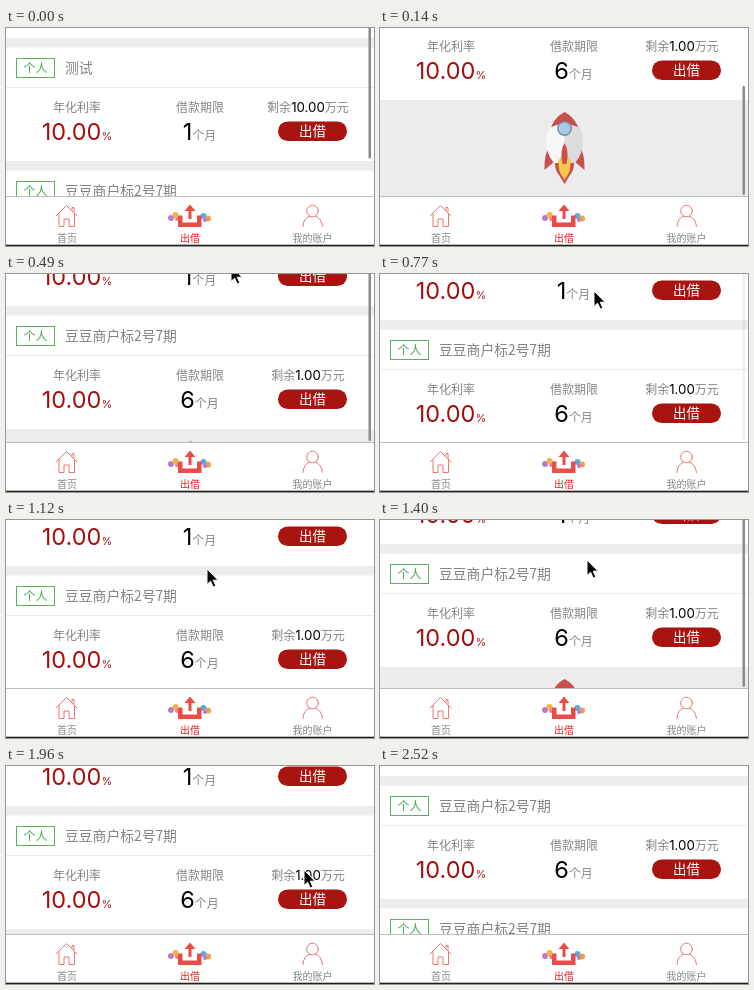
An HTML page that plays this animation: 368 by 218 pixels, repeating every 3.08 s.

```html
<!DOCTYPE html>
<html lang="zh">
<head>
<meta charset="utf-8">
<style>
  html, body { margin: 0; width: 100%; height: 100%; overflow: hidden; background: #fff; }
  svg { display: block; width: 368px; height: 218px; }
  text { font-family: Inter, "Noto Sans CJK SC", "Noto Sans CJK", sans-serif; }
  .cn { font-family: "Noto Sans CJK SC", "Noto Sans CJK", sans-serif; font-weight: 300; }
  .mid { text-anchor: middle; }
  .label { font-size: 12px; fill: #858585; }
  .tab { font-size: 10px; fill: #858585; }
</style>
</head>
<body>
<svg viewBox="0 0 368 218">
  <rect width="368" height="218" fill="#fff"/>
  <g id="list">
    <rect y="132" width="368" height="400" fill="#ececec"/>
    <g id="rocket">
      <path id="flame"/>
      <path id="core" fill="#f9c84a"/>
      <path d="M171 177Q164 185 164.500 203L175 194ZM198 177Q205 185 204.500 203L194 194Z" fill="#c8504c"/>
      <path d="M184.500 145Q166 157 166 174Q166 187 174 196H184.500Z" fill="#f7f7f7"/>
      <path d="M184.500 145Q203 157 203 174Q203 187 195 196H184.500Z" fill="#dcdcdc"/>
      <path d="M184.500 145Q175 150 171 160Q184.500 154 198 160Q194 150 184.500 145Z" fill="#c8504c"/>
      <circle cx="184.500" cy="161.500" r="7.500" fill="#7d8e9d"/>
      <circle cx="184.500" cy="161.500" r="6" fill="#a5cbe9"/>
      <path id="fire" fill="#f9c84a"/>
      <path d="M184.500 176Q189.500 184 186.500 197H182.500Q179.500 184 184.500 176Z" fill="#c8504c"/>
    </g>
    <g id="cards"></g>
  </g>
  <rect id="bar" x="362.500" width="2.500" rx="1.200" fill="#8b8b8b"/>
  <g id="tabs">
    <rect y="168" width="368" height="50" fill="#fff"/>
    <rect y="168" width="368" height="1" fill="#bdbdbd"/>
    <rect y="216.700" width="368" height="1.300" fill="#202020"/>
    <g fill="none" stroke="#e87772" stroke-width="1" stroke-linejoin="round" stroke-linecap="round">
      <path d="M50 188L60.500 177.500L71 188M53 185.500V198.500H58V191H63V198.500H68.500V185.500M68 184V179.500H66V182"/>
      <circle cx="306.500" cy="183" r="5.800"/>
      <path d="M297 198.500Q297.500 190 303.500 188.200M309.500 188.200Q315.500 190 316.500 198.500"/>
    </g>
    <g id="dots"></g>
    <path d="M172 187.500H176.500V194.500H191V187.500H195.500V199H172Z" fill="#ea4d48"/>
    <path d="M184 176.500L189.500 183H185.500V191H182.500V183H178.500Z" fill="#ea4d48"/>
    <text class="cn mid tab" x="61" y="214">首页</text>
    <text class="cn mid tab" x="184" y="214" style="fill:#e0241f;font-weight:500">出借</text>
    <text class="cn mid tab" x="306.500" y="214">我的账户</text>
  </g>
  <path id="cursor" d="M0 0V15.500L3.600 12.200L6.200 18L8.800 16.800L6.200 11.200H11Z" fill="#000" stroke="#fff" stroke-width="1"/>
</svg>
<script>
const $ = id => document.getElementById(id);
const LOOP = 3080, STEP = 70, PITCH = 123, REST = 36;

const card = (row, title, months, left) => `
  <g transform="translate(0 ${row * PITCH})">
    <rect y="10" width="368" height="10" fill="#ececec"/>
    <rect y="19.500" width="368" height="113.500" fill="#fff"/>
    <rect y="59" width="368" height="1" fill="#ebebeb"/>
    <rect x="10.500" y="30.500" width="38" height="19" fill="none" stroke="#58b15d"/>
    <text class="cn mid" x="29.500" y="44.500" font-size="12" fill="#4aa850">个人</text>
    <text class="cn" x="59" y="45" font-size="13.800" fill="#808080">${title}</text>
    <text class="cn mid label" x="71" y="83.500">年化利率</text>
    <text class="cn mid label" x="194" y="83.500">借款期限</text>
    <text class="mid" x="71" y="112" font-size="23.500" fill="#a5100f">10.00<tspan font-size="11">%</tspan></text>
    <text class="mid" x="193.500" y="112" font-size="23.500">${months}<tspan class="cn label">个月</tspan></text>
    <text class="mid" x="302" y="83.500" font-size="13.300"><tspan class="cn label">剩余</tspan>${left}<tspan class="cn label">万元</tspan></text>
    <rect x="272" y="93.500" width="69" height="19.500" rx="9.750" fill="#a8140f"/>
    <text class="cn mid" x="306.500" y="108.300" font-size="13.500" style="fill:#fff;font-weight:400">出借</text>
  </g>`;

const loan = "豆豆商户标2号7期";
$("cards").innerHTML =
  `<rect y="${-2 * PITCH}" width="368" height="${PITCH + 10}" fill="#fff"/>` +
  card(-1, "测试", 1, "10.00") + card(0, loan, 6, "1.00") +
  `<g id="more">${card(1, loan, 6, "1.00")}</g>`;

$("dots").innerHTML = [
  [165, 190, 3, "#b77bd0"], [169.5, 187, 3, "#f3b04b"], [171, 191, 2, "#e9827d"],
  [197.500, 188, 3, "#5aa9e6"], [202, 190.500, 3, "#f0a04b"], [199, 192, 2, "#b77bd0"]
].map(([x, y, r, c]) => `<circle cx="${x}" cy="${y}" r="${r}" fill="${c}"/>`).join("");

const clamp = v => Math.max(0, Math.min(1, v));
const out = n => p => 1 - (1 - p) ** n;
const smooth = p => p * p * (3 - 2 * p);

// start, end, from, to, easing
const moves = [
  [0, 210, PITCH, -68, out(3)],
  [210, 780, -68, REST, out(3)],
  [1260, 1680, REST, -50, smooth],
  [1680, 2100, -50, REST, out(2.4)],
  [2240, 2520, REST, 0, out(2)]
];

function scrollAt(t) {
  const [a, b, from, to, ease] = moves.filter(m => t >= m[0]).pop();
  return Math.round(from + (to - from) * ease(clamp((t - a) / (b - a))));
}

// time, x, y of the pointer tip
const path = [
  [420, 229, -30], [490, 225, -8], [1120, 201, 49], [1260, 198, 110],
  [1540, 215, -30], [1820, 270, -30], [1960, 298, 104], [2240, 310, 130], [2380, 345, 230]
];

function pointerAt(t) {
  const i = path.findIndex(k => k[0] > t);
  if (i < 1) return [0, -40];
  const a = path[i - 1], b = path[i], p = (t - a[0]) / (b[0] - a[0]);
  return [a[1] + (b[1] - a[1]) * p, a[2] + (b[2] - a[2]) * p];
}

function barOpacity(t) {
  if (t < 1190) return clamp((800 - t) / 240);
  return t < 1260 ? 0 : clamp((1950 - t) / 140);
}

function drawRocket(big) {
  $("flame").setAttribute("fill", big ? "#cf3f3a" : "#c8504c");
  $("flame").setAttribute("d", big
    ? "M176 191Q171 202 175 210L179 208L184.500 217L190 208L194 210Q198 202 193 191Z"
    : "M175 193Q174 202 179 208L184.500 217L190 208Q195 202 194 193Z");
  $("core").setAttribute("d", big
    ? "M179 195Q176 203 184.500 211Q193 203 190 195Z"
    : "M179 195Q177 203 184.500 213Q192 203 190 195Z");
  $("fire").setAttribute("d", big
    ? "M180 193Q179 200 184.500 204Q190 200 189 193Z"
    : "M178 194Q179 201 184.500 207Q190 201 191 194Q184.500 184 178 194Z");
}

function draw(t) {
  const y = scrollAt(t), second = t > 1120;
  $("list").setAttribute("transform", `translate(0 ${y})`);
  $("more").style.display = t >= 2310 ? "" : "none";
  drawRocket(second);

  // only the first pull squeezes the scroll bar
  const squeeze = second ? 0 : Math.max(0, REST - y);
  const end = 167 - Math.max(0, y - REST) * 0.42, top = Math.max(-10, end - 206 + squeeze);
  $("bar").setAttribute("y", top);
  $("bar").setAttribute("height", end - top);
  $("bar").setAttribute("opacity", barOpacity(t));

  $("cursor").setAttribute("transform", `translate(${pointerAt(t).map(Math.round)})`);
}

const start = performance.now();
function tick() {
  const t = (performance.now() - start) % LOOP;
  draw(Math.floor(t / STEP) * STEP);
  requestAnimationFrame(tick);
}
tick();
</script>
</body>
</html>
```
